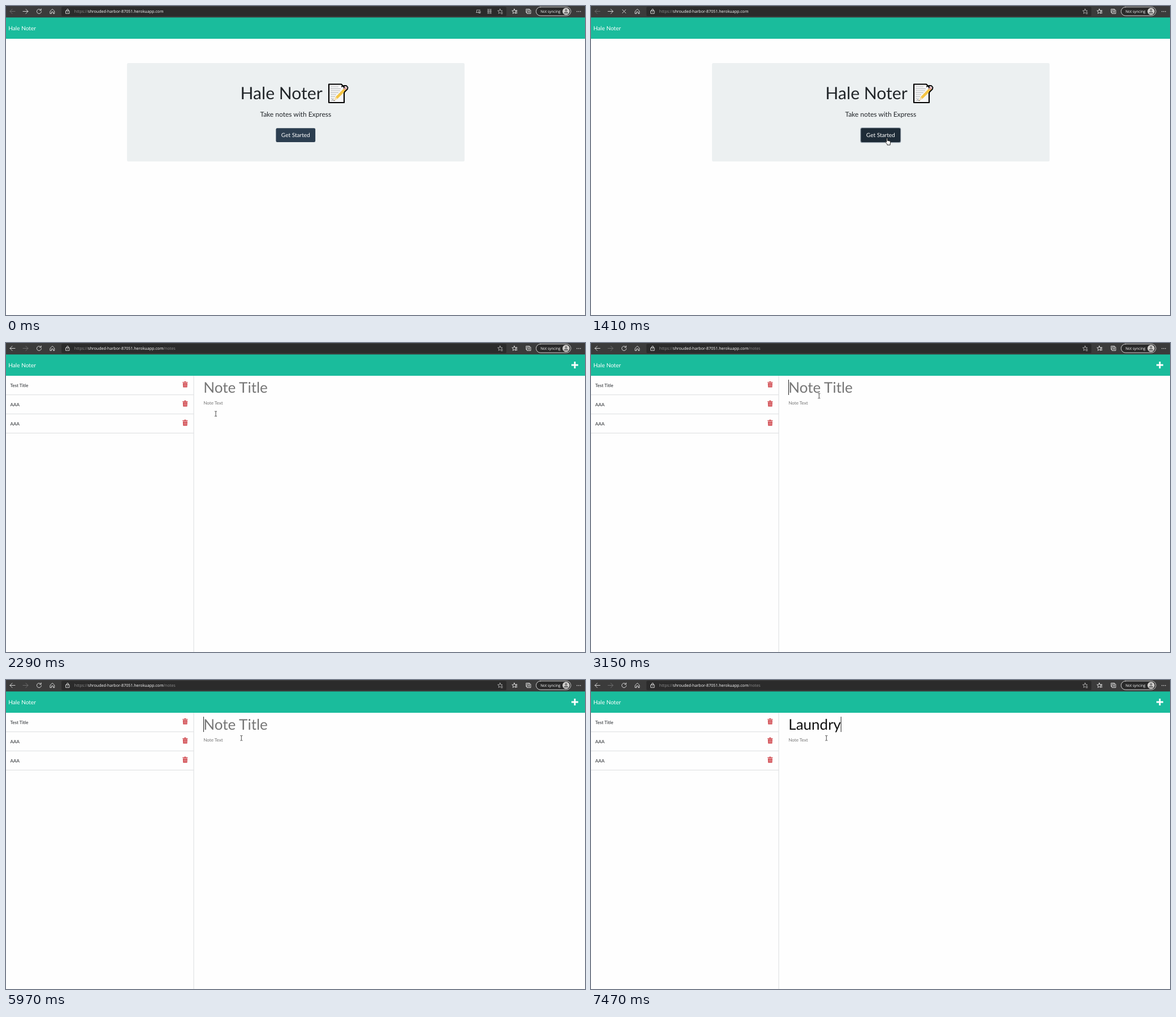
An HTML page for the animation above (8 s loop, 1024x547 px).

```html
<!DOCTYPE html>
<html lang="en">
<head>
<meta charset="utf-8">
<title>Hale Noter</title>
<style>
  html, body { margin: 0; width: 100%; height: 100%; overflow: hidden; background: #fefefe; }
  svg { display: block; width: 100%; height: 100%; }
  text { font-family: Lato, sans-serif; fill: #212529; text-rendering: geometricPrecision; white-space: pre; }
  .ui text { font-family: "Open Sans", "Noto Sans", sans-serif; font-size: 7.1px; fill: #fff; }
  .ui text .dim { fill: #8f8f8f; }
  .icon { fill: none; stroke: #e6e6e6; stroke-width: .9; stroke-linecap: round; stroke-linejoin: round; }
  .off { stroke: #737373; }
  .small { font-size: 8.07px; }
  .big { font-size: 26px; }
  .hint { fill: #757575; }
</style>
</head>
<body>
<svg viewBox="0 0 1024 547">
  <defs>
    <path id="arrow" d="M4.5 0H-4.5M-.5-4L-4.5 0L-.5 4"/>
    <path id="star" d="M0-4.3L1.2-1.4L4.2-1.2L1.9.8L2.6 3.8L0 2.2L-2.6 3.8L-1.9.8L-4.2-1.2L-1.2-1.4Z"/>
    <g id="bin" fill="#d0474d">
      <path d="M-4.6-4.3H-1.8L-1.2-5.4H1.2L1.8-4.3H4.6V-3H-4.6Z"/>
      <path d="M-4-2.4H4L3.6 5.3H-3.6Z"/>
      <path d="M-1.8-1V4M0-1V4M1.8-1V4" stroke="#fff" stroke-width=".6" opacity=".75"/>
    </g>
  </defs>

  <g id="home">
    <rect x="214" y="101" width="597" height="174.300" rx="2.500" fill="#ecf0f1"/>
    <text x="414.600" y="165" font-size="30.100">Hale Noter</text>
    <g stroke-linejoin="round">
      <path d="M571 138.500H593L598 143.500V171H571Z" fill="#f7f7f7" stroke="#000" stroke-width="2.200"/>
      <path d="M574 143H588M574 146.500H592M574 150H591M574 153.500H588M574 157H584M574 160.500H582M574 164H580" stroke="#a9adb0" stroke-width=".9"/>
      <path d="M580 167.500L583 161L599.500 144L603 147.500L586.500 164Z" fill="#f5c443"/>
      <path d="M580 167.500L583 161L586.500 164Z" fill="#f3dfb8"/>
      <path d="M593 143L598.500 140.800L602 141.200L604.500 144L604 147L598.500 152.500" fill="none" stroke="#000" stroke-width="1.800"/>
      <path d="M597 146.300L600.500 142.800L603 145.300L599.500 149Z" fill="#d9a2a8"/>
      <path d="M576 168C578 164 579 166 579 167.500H582" fill="none" stroke="#666" stroke-width=".8"/>
    </g>
    <text x="512.300" y="196" font-size="12" text-anchor="middle">Take notes with Express</text>
    <rect id="ring" x="476.300" y="215.200" width="71.900" height="27" rx="3" fill="#8f9ba6"/>
    <rect id="button" x="477.400" y="216.300" width="69.700" height="24.600" rx="2.200"/>
    <text x="512.300" y="232.400" font-size="10.090" text-anchor="middle" style="fill:#fff">Get Started</text>
  </g>

  <g id="notes">
    <path d="M332 58V547" stroke="#dfe1e3" stroke-width="1.200"/>
    <text id="title" class="big" x="349.300" y="88"></text>
    <text class="small hint" x="349.300" y="109.200">Note Text</text>
    <rect id="caret" y="65" width="1" height="27" fill="#222"/>
  </g>
  <g id="list"></g>

  <rect y="20" width="1024" height="38" fill="#1abc9c"/>
  <text x="4.300" y="43" font-size="10.090" style="fill:#fff">Hale Noter</text>
  <path id="plus" d="M1006 33V45M1000 39H1012" stroke="#fff" stroke-width="2.800"/>

  <g class="ui">
    <rect width="1024" height="20.300" fill="#3b3b3b"/>
    <rect x="98" y="1.500" width="787" height="16.500" rx="2" fill="#2b2b2b"/>
    <g class="icon">
      <use id="back" href="#arrow" x="11.500" y="9.500"/>
      <use id="forward" href="#arrow" transform="translate(34.500 9.500) scale(-1 1)"/>
      <path id="reload" d="M61.800 7.300A4 4 0 1 0 62.500 9.800M62.200 5V7.700H59.500"/>
      <path id="stop" d="M55.500 6.500L61.500 12.500M61.500 6.500L55.500 12.500"/>
      <path d="M78.300 9L82 5.500L85.700 9V13.500H83.500V10.500H80.500V13.500H78.300Z"/>
      <path d="M106 8.500H112V13.300H106ZM107.500 8.500V7A1.500 1.500 0 0 1 110.500 7V8.500M109 10.500V11"/>
      <g id="tools" stroke="#b5b5b5">
        <path d="M838 11.500H831.500M832.500 11.500V7H838.500M836.500 9H839V12.500H836.500Z"/>
        <path d="M851.500 6H858.500M851.500 13H858.500M853 6V13M857 6V13M851.500 8.500H858.500M851.500 10.500H858.500" stroke-width=".8"/>
      </g>
      <use href="#star" x="873.800" y="9.500" stroke="#b5b5b5"/>
      <circle cx="876.800" cy="12.500" r="2.400" fill="#b5b5b5" stroke="#2b2b2b"/>
      <path d="M875.500 12.500H878.100M876.800 11.200V13.800" stroke="#2b2b2b" stroke-width=".7"/>
      <use href="#star" x="899" y="9.500"/>
      <path d="M901.500 8H904M902 10.300H904M902 12.500H904"/>
      <path d="M921 11.500H919.800V5.500H926V7M921.800 7.300H928V13.500H921.800ZM924.900 8.800V12M923.300 10.400H926.500"/>
      <rect x="937.500" y="1.800" width="61.500" height="15.400" rx="7.700" fill="#2a2a2a"/>
    </g>
    <circle cx="990.500" cy="9.500" r="6.300" fill="#d2d0ce"/>
    <g fill="#777"><circle cx="990.500" cy="7.500" r="2.100"/><path d="M986.500 13.500A4 3.500 0 0 1 994.500 13.500Z"/></g>
    <g fill="#eee"><circle cx="1009.900" cy="9.800" r=".8"/><circle cx="1012.900" cy="9.800" r=".8"/><circle cx="1015.900" cy="9.800" r=".8"/></g>
    <text x="120.800" y="12.300"><tspan class="dim">https://</tspan>shrouded-harbor-87051.herokuapp.com<tspan class="dim" id="path">/notes</tspan></text>
    <text x="945.200" y="12" style="font-size:6.500px">Not syncing</text>
  </g>

  <g id="cursor">
    <path id="pointer" d="M0 0V10.200L2.400 8L4 11.500L5.500 10.800L4 7.400H7.200Z" fill="#fff" stroke="#111" stroke-width=".7"/>
    <path id="hand" d="M-.9.7C-.9-.4.9-.4.9.7V4.300L4.900 5.200Q6.200 5.600 6 7L5.400 10V12H.2V10.600L-2.800 7.300C-3.200 6.300-2.100 5.700-1.500 6.300L-.9 6.900Z" fill="#fff" stroke="#111" stroke-width=".9" stroke-linejoin="round"/>
    <path id="beam" d="M-2-4.300H-.6L0-3.800L.6-4.300H2M0-3.800V3.800M-2 4.300H-.6L0 3.800L.6 4.300H2" fill="none" stroke="#333" stroke-width=".9"/>
  </g>
</svg>
<script>
const LOOP = 8000, STEP = 80, ENTER = 290;
const PRESS = 1160, LOADING = 1240, OPEN = 1490, LISTED = 1560, FOCUS = 2690;
const WORD = "Laundry", keyTimes = [6120, 6370, 6590, 6760, 7220, 7390, 7470];
const blinkTimes = [FOCUS, 3310, 3860, 4410, 4960, 5500, 5970];

// Pointer track: time, x, y
const track = [
  [290, 976, 529], [450, 900, 455], [770, 600, 290], [930, 540, 245], [1090, 523.7, 234],
  [1650, 523.7, 234], [1730, 519, 248], [1810, 506, 259], [1890, 482, 250], [2050, 420, 185],
  [2210, 375, 133], [2290, 371, 125.3], [2370, 376, 112], [2450, 391, 98.5], [2530, 391, 98.5],
  [2610, 390, 88], [2690, 388, 82], [2850, 388, 82], [2930, 394, 87], [3310, 416.3, 102.8]
];

const $ = id => document.getElementById(id);
const show = (id, on) => $(id).setAttribute("display", on ? "inline" : "none");
const passed = (times, t) => times.filter(x => x <= t).length;

$("list").innerHTML = ["Test Title", "AAA", "AAA"].map((name, i) => `
  <g transform="translate(0 ${i * 33.9})">
    <text class="small" x="7.500" y="78">${name}</text>
    <use href="#bin" x="316.800" y="73.300"/>
    <path d="M0 91.700H332" stroke="#dcdee0"/>
  </g>`).join("");

function pointerAt(t) {
  const s = ENTER + Math.floor((t - ENTER) / STEP) * STEP;
  const i = track.findIndex(k => k[0] > s);
  if (i < 0) return track[track.length - 1].slice(1);
  if (i === 0) return track[0].slice(1);
  const [t0, x0, y0] = track[i - 1], [t1, x1, y1] = track[i];
  const p = (s - t0) / (t1 - t0);
  return [x0 + (x1 - x0) * p, y0 + (y1 - y0) * p];
}

function drawPointer(t) {
  const [x, y] = pointerAt(t);
  const over = t < OPEN && x > 477 && x < 547 && y > 216 && y < 241;
  const hand = over || (t >= OPEN && t < 1700);
  show("cursor", t >= ENTER);
  $("cursor").setAttribute("transform", `translate(${x} ${y})`);
  show("hand", hand);
  show("pointer", !hand && t < OPEN);
  show("beam", !hand && t >= OPEN);
  $("button").setAttribute("fill", t >= PRESS ? "#1e2b37" : over ? "#202d3b" : "#2c3e50");
}

function drawTitle(t) {
  const typed = WORD.slice(0, passed(keyTimes, t)), title = $("title");
  title.textContent = typed || "Note Title";
  title.style.fill = typed ? "#111" : "#757575";
  $("caret").setAttribute("x", 349 + (typed ? title.getComputedTextLength() : 0));
  show("caret", typed || passed(blinkTimes, t) % 2);
}

function draw(t) {
  const open = t >= OPEN, loading = t >= LOADING && !open;
  show("home", !open);
  show("ring", t >= PRESS);
  for (const id of ["notes", "plus", "path"]) show(id, open);
  show("list", t >= LISTED);
  show("tools", t < LOADING);
  show("reload", !loading);
  show("stop", loading);
  $("back").setAttribute("class", open ? "" : "off");
  $("forward").setAttribute("class", open ? "off" : "");
  drawTitle(t);
  drawPointer(t);
}

const start = performance.now();
function tick() {
  draw((performance.now() - start) % LOOP);
  requestAnimationFrame(tick);
}
tick();
</script>
</body>
</html>
```
